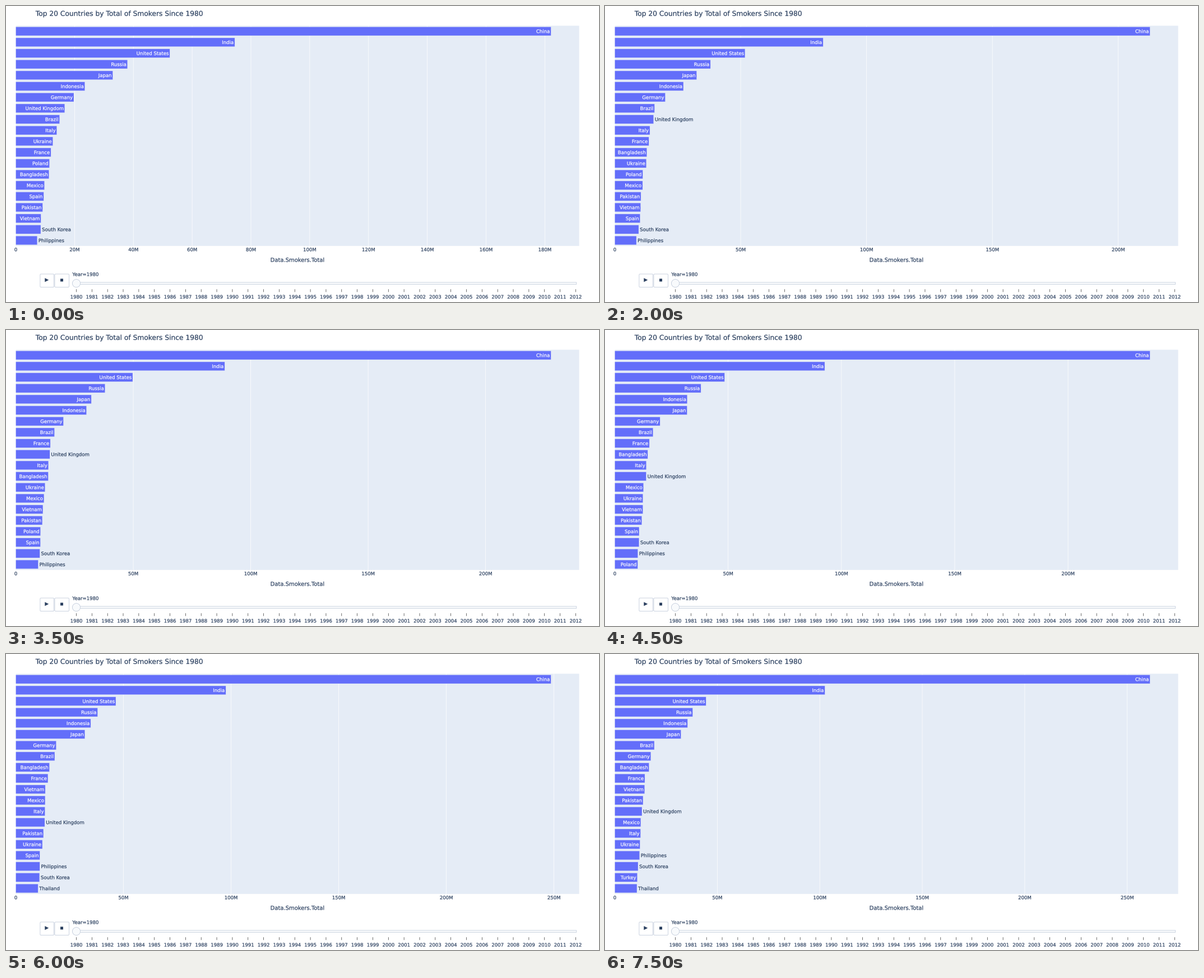
Animation of 1058 by 529 pixels, one loop 8 s. Source, as a matplotlib script:

```python
import matplotlib.pyplot as plt
import numpy as np
from matplotlib.animation import FuncAnimation
from matplotlib.patches import Circle, FancyBboxPatch, Polygon, Rectangle
from matplotlib.patheffects import Stroke

W, H, DPI = 1058, 529, 64
YEARS, STEP_MS = 16, 500
LEFT, RIGHT, TOP, BOTTOM = 17.5, 1022.6, 35.3, 428.8
ROWS = 20
PITCH = (BOTTOM - TOP) / ROWS
PAD = 2.1
SMALL = 8.55
INK, BAR, PANEL = "#2a3f5f", "#636efa", "#e5ecf6"
BORDER, PALE = "#bec8d9", "#f8fafc"

plt.rcParams.update({"font.family": "DejaVu Sans", "text.hinting": "none"})

# Millions of smokers: first and last value of a straight trend,
# then, where the trend turns, the year and value of the bend.
TRENDS = {
    "China": (182.1, 261.1, 4.8, 218.7),
    "India": (74.5, 102.5, 8, 91),
    "United States": (52.4, 44.5, 3, 52.4),
    "Russia": (38, 38),
    "Japan": (33, 32.3, 9, 31.9),
    "Indonesia": (23.5, 35.5, 12, 34.8),
    "Germany": (19.74, 17.6, 8, 20.35),
    "United Kingdom": (16.65, 13.26, 10, 13.55),
    "Brazil": (14.9, 19.28, 9, 16.9),
    "Italy": (13.95, 12.58, 11, 13.9),
    "Ukraine": (12.62, 12.3),
    "France": (11.95, 14.65, 8.5, 15.3),
    "Poland": (11.45, 8.92, 4, 11.12),
    "Bangladesh": (11.3, 16.7),
    "Mexico": (9.75, 12.69, 12, 13.65),
    "Spain": (9.5, 10.3, 12, 11.17),
    "Pakistan": (9.13, 13.8),
    "Vietnam": (8.55, 14.57, 12, 13.7),
    "South Korea": (8.49, 11.35, 9, 10.72),
    "Philippines": (7.3, 12.1),
    "Turkey": (7, 11),
    "Thailand": (6.5, 10.8, 10, 10),
}

fig = plt.figure(figsize=(W / DPI, H / DPI), dpi=DPI, facecolor="white")
ax = fig.add_axes([0, 0, 1, 1])
ax.set(xlim=(0, W), ylim=(H, 0))
ax.axis("off")


def pt(px):
    return px * 72 / DPI


def label(x, y, s="", size=SMALL, ha="center", color=INK):
    """Text whose capitals are centred on y, slightly thickened."""
    return ax.text(x, y + 0.365 * size, s, fontsize=pt(size), ha=ha,
                   va="baseline", color=color, zorder=5,
                   path_effects=[Stroke(linewidth=pt(0.2))])


def shape(patch):
    patch.set_snap(False)
    return ax.add_patch(patch)


def box(x0, y0, x1, y1, fc, ec="none", lw=0.0, z=1):
    return shape(Rectangle((x0, y0), x1 - x0, y1 - y0, fc=fc, ec=ec,
                           lw=pt(lw), zorder=z))


def button(x0, x1):
    shape(FancyBboxPatch((x0 + 1.5, 480.5), x1 - x0 - 3, 20.5,
                         boxstyle="round,pad=1.5,rounding_size=1.5",
                         fc="white", ec=BORDER, lw=pt(0.8)))


def draw_static():
    label(52.8, 13.2, "Top 20 Countries by Total of Smokers Since 1980", 12.25, "left")
    label(520, 453.6, "Data.Smokers.Total", 9.98)
    box(LEFT, TOP, RIGHT, BOTTOM, PANEL)

    button(60.9, 85.6)
    button(87, 112.4)
    shape(Polygon([(69.3, 486.2), (76.2, 489.7), (69.3, 493.2)], fc=INK, zorder=3))
    box(97, 487.4, 102, 492.4, INK, z=3)

    label(118.4, 479.4, "Year=1980", ha="left")
    box(118.8, 493.9, 1017.8, 497.4, PALE, BORDER, 0.75)
    shape(Circle((125.5, 495.6), 7.1, fc=PALE, ec=BORDER, lw=pt(0.75), zorder=3))
    for k in range(33):
        x = 125.5 + 27.84 * k
        box(x - 0.36, 506.2, x + 0.36, 511.2, "#333333")
        label(x, 519.7, str(1980 + k))


def value(name, year):
    first, last, *bend = TRENDS[name]
    years, values = [0, *bend[:1], YEARS - 1], [first, *bend[1:], last]
    return np.interp(year, years, values)


def text_width(s):
    probe = label(0, 0, s)
    width = probe.get_window_extent().width
    probe.remove()
    return width


draw_static()
grid = [box(0, TOP, 0.72, BOTTOM, "white", z=2) for _ in range(10)]
ticks = [label(0, 435.2) for _ in range(10)]
bars = [box(LEFT, TOP + PITCH * (r + 0.1), LEFT, TOP + PITCH * (r + 0.9),
            BAR, PANEL, 0.36, z=3) for r in range(ROWS)]
names = [label(0, TOP + PITCH * (r + 0.5)) for r in range(ROWS)]
widths = {name: text_width(name) for name in TRENDS}


def update(year):
    data = {name: value(name, year) for name in TRENDS}
    top = sorted(data, key=data.get, reverse=True)[:ROWS]
    span = data[top[0]] / 0.95
    scale = (RIGHT - LEFT) / span

    step = 20 if span <= 200 else 50
    for k, (line, tick) in enumerate(zip(grid, ticks)):
        x = LEFT + k * step * scale
        shown = k * step <= span
        line.set_x(x - 0.36)
        line.set_visible(shown)
        tick.set_x(x)
        tick.set_text(f"{k * step}M" if k else "0")
        tick.set_visible(shown)

    for bar, text, name in zip(bars, names, top):
        length = data[name] * scale
        bar.set_width(length)
        inside = widths[name] + 2 * PAD <= length
        text.set_text(name)
        text.set_ha("right" if inside else "left")
        text.set_x(LEFT + length + (-PAD if inside else PAD))
        text.set_color("white" if inside else INK)
    return grid + ticks + bars + names


anim = FuncAnimation(fig, update, frames=YEARS, interval=STEP_MS,
                     repeat=True, repeat_delay=0, blit=False)
plt.show()
```
